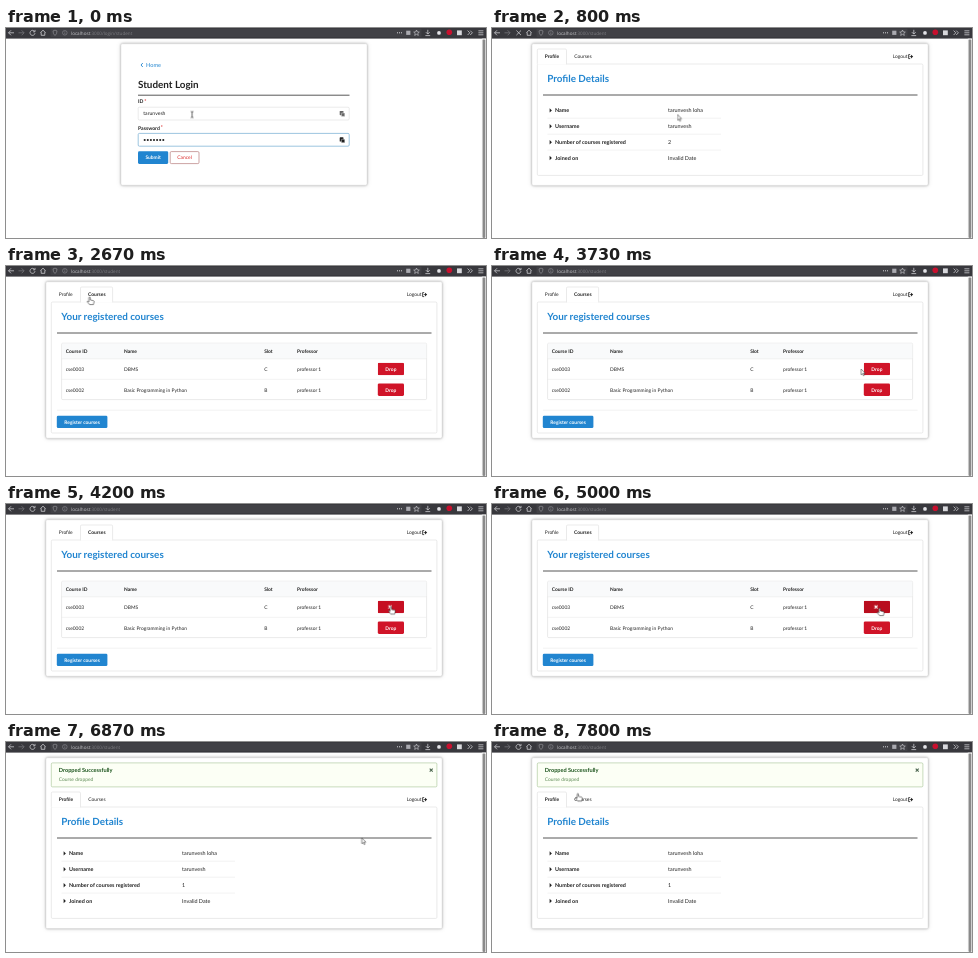
An HTML page for the animation above (8000 ms loop, 480 by 210 pixels).

```html
<!DOCTYPE html>
<html lang="en">
<head>
<meta charset="utf-8">
<title>Student portal</title>
<style>
html, body { margin: 0; width: 100%; height: 100%; overflow: hidden; background: #fff; }
svg.stage { display: block; width: 100vw; height: 100vh; }
text { font: 4.92px Lato, sans-serif; fill: #222; text-rendering: geometricPrecision; }
.b { font-weight: 700; }
.h1 { font-size: 9.9px; font-weight: 700; }
.blue { fill: #2185d0; }
.list text { font-size: 5.41px; }
.field { font-size: 5.1px; }
.mid { text-anchor: middle; }
.white { fill: #fff; }
.red { fill: #d01428; }
.url { font: 4.6px "Open Sans", sans-serif; fill: #7d7d82; }
.url tspan { fill: #c4c4c8; }
.ico { fill: none; stroke: #d4d4d8; stroke-width: .75; }
.card { fill: #fff; stroke: #d4d4d5; stroke-width: .4; filter: drop-shadow(0 .7px 1.3px #0004) drop-shadow(0 .7px 2px #0002); }
.box { fill: #fff; stroke: #d4d4d5; stroke-width: .5; }
.rule { stroke: #444; stroke-width: .9; }
.thin { stroke: #e4e4e5; stroke-width: .5; }

/* one 8 s clock: percent = ms / 80 */
.cut { animation: 8s step-end infinite; }
.login { animation-name: login; }
.profile { animation-name: profile; }
.courses { animation-name: courses; }
.done { animation-name: done; }
.before { animation-name: before; }
.shift { animation-name: shift; }
.stop { animation-name: stop; }
.reload { animation-name: reload; }
.dot { animation-name: dot; }
.long { animation-name: long; }
.short { animation-name: short; }
.beam { animation-name: login; }
.arrow { animation-name: arrow; }
.hand { animation-name: hand; }
.hot { animation-name: hot; }
@keyframes login { 0% { opacity: 1 } 9.125%, 100% { opacity: 0 } }
@keyframes profile { 0% { opacity: 0 } 9.125% { opacity: 1 } 31.625% { opacity: 0 } 80.875%, 100% { opacity: 1 } }
@keyframes courses { 0% { opacity: 0 } 31.625% { opacity: 1 } 80.875%, 100% { opacity: 0 } }
@keyframes done { 0% { opacity: 0 } 80.875%, 100% { opacity: 1 } }
@keyframes before { 0% { opacity: 1 } 80.875%, 100% { opacity: 0 } }
@keyframes shift { 0% { transform: none } 80.875%, 100% { transform: translateY(29px) } }
@keyframes stop { 0% { opacity: 0 } 4.125% { opacity: 1 } 15% { opacity: 0 } 73.375% { opacity: 1 } 80.875%, 100% { opacity: 0 } }
@keyframes reload { 0% { opacity: 1 } 4.125% { opacity: 0 } 15% { opacity: 1 } 73.375% { opacity: 0 } 80.875%, 100% { opacity: 1 } }
@keyframes dot { 0% { opacity: 0 } .875%, 100% { opacity: 1 } }
@keyframes long { 0% { opacity: 1 } 5.875%, 100% { opacity: 0 } }
@keyframes short { 0% { opacity: 0 } 5.875%, 100% { opacity: 1 } }
@keyframes arrow { 0% { opacity: 0 } 9.125% { opacity: 1 } 22.5% { opacity: 0 } 39.125% { opacity: 1 } 47.125% { opacity: 0 } 80.875% { opacity: 1 } 96.7%, 100% { opacity: 0 } }
@keyframes hand { 0% { opacity: 0 } 22.5% { opacity: 1 } 39.125% { opacity: 0 } 47.125% { opacity: 1 } 80.875% { opacity: 0 } 96.7%, 100% { opacity: 1 } }
@keyframes hot { 0% { fill: #d01428 } 47.125% { fill: #c60f22 } 60.875% { fill: #b90d1e } 64.125%, 100% { fill: #c60f22 } }

.out { animation: out 8s ease infinite; }
.in { animation: in 8s ease infinite; }
@keyframes out { 0%, 47.125% { transform: none } 50.875%, 100% { transform: translateX(-26px) } }
@keyframes in { 0%, 47.125% { transform: translateX(26px) } 50.875%, 100% { transform: none } }

.pointer { animation: move 8s linear infinite; }
@keyframes move {
  0%, 14.2% { transform: translate(185.5px, 86.5px); animation-timing-function: ease-in-out }
  24.125%, 38.3% { transform: translate(83.7px, 31px) }
  41.625%, 44.2% { transform: translate(309.5px, 97px) }
  46.625% { transform: translate(369px, 103px) }
  48.75% { transform: translate(384px, 110px) }
  52.5%, 54.9% { transform: translate(385px, 102.5px) }
  55%, 60% { transform: translate(387px, 103px) }
  62.5%, 66.5% { transform: translate(387.7px, 104px) }
  66.625%, 72.5% { transform: translate(389px, 104px) }
  76.625%, 84.2% { transform: translate(390.6px, 104.3px); animation-timing-function: ease-in-out }
  91.5% { transform: translate(74px, 27.5px) }
  95%, 95.1% { transform: translate(80px, 38.5px) }
  97.5%, 100% { transform: translate(86px, 51.5px) }
}
</style>
</head>
<body>
<svg class="stage" viewBox="0 0 480 210">
  <defs>
    <g id="key"><rect x="-2.3" y="-2.6" width="3.8" height="4.2" rx=".6"/><rect x="-.6" y="-.6" width="3.4" height="3.4" rx=".5" stroke="#fff" stroke-width=".4"/></g>
    <path id="tri" d="M57.6 0l2.3 2.2-2.3 2.2z" fill="#222"/>
    <g id="logout">
      <text x="400.7" y="30.3">Logout</text>
      <path d="M418.2 26.6h-1.6v4h1.6M417.6 28.6h1.6" fill="none" stroke="#222" stroke-width=".8"/>
      <path d="M419 26.8l2.2 1.8-2.2 1.8z" fill="#222"/>
    </g>
  </defs>

  <!-- login page -->
  <g class="cut login">
    <rect class="card" x="115" y="15.8" width="246" height="141.4" rx="1.4"/>
    <path d="M136.8 35l-1.8 2 1.8 2" fill="none" stroke="#2185d0" stroke-width=".9"/>
    <text class="blue" x="140" y="39" style="font-size:5.62px">Home</text>
    <text class="h1" x="132" y="59.6">Student Login</text>
    <path class="rule" d="M132 67.2H343.5"/>
    <text class="b field" x="132" y="75.4">ID<tspan dx=".8" dy="-.6" fill="#db2828">*</tspan></text>
    <rect class="box" x="132.2" y="79.2" width="211" height="12.8" rx="1.2"/>
    <text class="field" x="137.3" y="87.3">tarunvesh</text>
    <use href="#key" x="336" y="85.6" fill="#666"/>
    <text class="b field" x="132" y="101.8">Password<tspan dx=".8" dy="-.6" fill="#db2828">*</tspan></text>
    <rect class="box" x="132.2" y="105.4" width="211" height="12.8" rx="1.2" style="stroke:#85b7d9;stroke-width:.8"/>
    <path d="M138.7 112h18.7" stroke="#222" stroke-width="2.1" stroke-linecap="round" stroke-dasharray="0 3.1"/>
    <circle class="cut dot" cx="160.4" cy="112" r="1.05" fill="#222"/>
    <use href="#key" x="336" y="111.9" fill="#222"/>
    <rect class="blue" x="132" y="123.3" width="30.2" height="12.6" rx="1.3"/>
    <text class="b white mid" x="147.1" y="131.4">Submit</text>
    <rect x="164.2" y="123.6" width="28.8" height="12" rx="1.2" fill="#fff" stroke="#a66" stroke-width=".6"/>
    <text class="mid" x="178.6" y="131.4" style="fill:#db2828">Cancel</text>
  </g>

  <!-- profile page -->
  <g class="cut profile">
    <rect class="card cut before" x="40" y="15.8" width="396" height="141.6" rx="1.4"/>
    <g class="cut done">
      <rect class="card" x="40" y="15.8" width="396" height="170.8" rx="1.4"/>
      <rect x="45.3" y="20.9" width="385.6" height="24" rx="1.2" fill="#fcfff5" stroke="#a3c293" stroke-width=".6"/>
      <text class="b" x="52.7" y="30.4" style="font-size:5.62px;fill:#1a531b">Dropped Successfully</text>
      <text x="52.7" y="38.6" style="fill:#5d8a55">Course dropped</text>
      <path d="M423.7 26.7l3 3m0-3l-3 3" stroke="#4c6650" stroke-width="1.1"/>
    </g>
    <g class="cut shift">
      <rect class="box" x="45.3" y="36" width="385.6" height="111.4" rx="1.2"/>
      <path class="box" d="M45.3 36.3V22.2q0-1.2 1.2-1.2H73.3q1.2 0 1.2 1.2V36.3" />
      <path d="M45.6 36h28.6" stroke="#fff" stroke-width=".9"/>
      <text class="b" x="52.8" y="30.3">Profile</text>
      <text x="82.2" y="30.3">Courses</text>
      <use href="#logout"/>
      <text class="h1 blue" x="55.2" y="54">Profile Details</text>
      <path class="rule" d="M51 67H425.5"/>
      <path class="thin" d="M55.5 90.2H229M55.5 106.2H229M55.5 122.1H229"/>
      <g class="list">
        <use href="#tri" y="80.2"/><text class="b" x="63" y="84.3">Name</text><text x="176" y="84.3">tarunvesh loha</text>
        <use href="#tri" y="96.1"/><text class="b" x="63" y="100.2">Username</text><text x="176" y="100.2">tarunvesh</text>
        <use href="#tri" y="112"/><text class="b" x="63" y="116.1">Number of courses registered</text>
        <text class="cut before" x="176" y="116.1">2</text><text class="cut done" x="176" y="116.1">1</text>
        <use href="#tri" y="127.8"/><text class="b" x="63" y="131.9">Joined on</text><text x="176" y="131.9">Invalid Date</text>
      </g>
    </g>
  </g>

  <!-- courses page -->
  <g class="cut courses">
    <rect class="card" x="40" y="15.8" width="396" height="156.4" rx="1.4"/>
    <rect class="box" x="45.3" y="36" width="385.6" height="131" rx="1.2"/>
    <path class="box" d="M74.5 36.3V22.2q0-1.2 1.2-1.2H105.4q1.2 0 1.2 1.2V36.3"/>
    <path d="M74.8 36h31.5" stroke="#fff" stroke-width=".9"/>
    <text x="52.8" y="30.3">Profile</text>
    <text class="b" x="82" y="30.3">Courses</text>
    <use href="#logout"/>
    <text class="h1 blue" x="55.2" y="54">Your registered courses</text>
    <path class="rule" d="M51 67H425.5"/>
    <rect class="box" x="55.6" y="77.2" width="365" height="56.4" rx="1.2"/>
    <rect x="55.9" y="77.5" width="364.4" height="15.2" rx="1" fill="#f9fafb"/>
    <path class="thin" d="M55.6 92.8H420.6M55.6 113.3H420.6M51 144.2H425.5"/>
    <g class="b">
      <text class="b" x="59.7" y="86.8">Course ID</text><text class="b" x="118" y="86.8">Name</text>
      <text class="b" x="258.2" y="86.8">Slot</text><text class="b" x="291" y="86.8">Professor</text>
    </g>
    <text x="59.7" y="104.8">cse0003</text><text x="118" y="104.8">DBMS</text><text x="258.2" y="104.8">C</text><text x="291" y="104.8">professor 1</text>
    <text x="59.7" y="125.5">cse0002</text><text x="118" y="125.5">Basic Programming in Python</text><text x="258.2" y="125.5">B</text><text x="291" y="125.5">professor 1</text>
    <svg x="371.8" y="96.8" width="26.2" height="12.4">
      <rect class="red cut hot" width="26.2" height="12.4" rx="1.3"/>
      <text class="b white mid out" x="13.1" y="8">Drop</text>
      <path class="in" d="M10.7 4.7l3 3m0-3l-3 3" stroke="#fff" stroke-width="1.2"/>
    </svg>
    <rect class="red" x="371.8" y="117.5" width="26.2" height="12.4" rx="1.3"/>
    <text class="b white mid" x="384.9" y="125.5">Drop</text>
    <rect class="blue" x="50.8" y="149.7" width="50.6" height="12.4" rx="1.3"/>
    <text class="b white mid" x="76.1" y="157.7">Register courses</text>
  </g>

  <!-- browser bar -->
  <rect width="480" height="10.6" fill="#38383d"/>
  <rect x="44.5" y=".8" width="371" height="8.2" rx=".8" fill="#414146"/>
  <g class="ico">
    <path d="M8 4.8H2.6M5 2.3L2.5 4.8 5 7.3"/>
    <path d="M12.5 4.8H18M15.6 2.3l2.5 2.5-2.5 2.5" stroke="#77777c"/>
    <path class="cut reload" d="M28.4 3.2A2.5 2.5 0 1 0 29 5.2M29 1.9V3.8H27"/>
    <path class="cut stop" d="M24.4 2.5l4.6 4.6m0-4.6l-4.6 4.6"/>
    <path d="M34.3 4.8L37 2.2l2.7 2.6M35.2 4.4V7.3H38.8V4.4"/>
    <path d="M49 2.2l2 .7q0 3.4-2 4.6-2-1.2-2-4.6z" stroke="#97979c" stroke-width=".6"/>
    <g stroke="#97979c" stroke-width=".5"><circle cx="58.8" cy="4.8" r="2.3"/><path d="M58.8 4.4V6.2M58.8 3.2v.6"/></g>
    <path d="M391 4.8h5" stroke-width="1" stroke-dasharray="1 1"/>
    <path d="M410.5 2l.8 1.9 2 .2-1.5 1.3.5 2-1.8-1.1-1.8 1.1.5-2-1.5-1.3 2-.2z" stroke-width=".6"/>
    <path d="M421.8 1.8V6M419.9 4.2l1.9 1.9 1.9-1.9M419.4 7.6h4.8"/>
    <path d="M461.6 2.6l2.2 2.2-2.2 2.2M464.2 2.6l2.2 2.2-2.2 2.2"/>
    <path d="M472.4 2.8h5M472.4 4.8h5M472.4 6.8h5"/>
  </g>
  <rect x="400.2" y="2.7" width="4.2" height="4.2" fill="#aaaab0"/>
  <circle cx="433" cy="4.9" r="1.9" fill="#e4e4e8"/>
  <circle cx="443.3" cy="4.2" r="2.8" fill="#c8102e"/>
  <rect x="451" y="2.4" width="4.8" height="4.8" fill="#d8d8dc"/>
  <text class="url cut long" x="65" y="6.5"><tspan>localhost</tspan>:3000/login/student</text>
  <text class="url cut short" x="65" y="6.5"><tspan>localhost</tspan>:3000/student</text>
  <rect x="475.8" y="10.6" width="4.2" height="199.4" fill="#f0f0f0"/>
  <rect x="476.6" y="11.4" width="2.7" height="198.6" rx="1.2" fill="#8a8a8a"/>

  <g class="pointer">
    <path class="cut beam" d="M-.6-3q1.2 0 1.2.8 0-.8 1.2-.8M.6-2.5V2.7M-.6 3.2q1.2 0 1.2-.8 0 .8 1.2.8" fill="none" stroke="#222" stroke-width=".7"/>
    <path class="cut arrow" d="M0 0V5.8L1.4 4.6 2.3 6.7 3.2 6.3 2.3 4.2H4.1Z" fill="#fff" stroke="#222" stroke-width=".5"/>
    <path class="cut hand" d="M-.9.8C-.9-.1.6-.1.6.8V3L3.6 3.6Q4.4 3.8 4.3 4.8L3.7 7.6H-.2L-2.4 4.9Q-2.6 4-1.6 4.1L-.9 4.8Z" fill="#fff" stroke="#222" stroke-width=".55"/>
  </g>
</svg>
</body>
</html>
```
